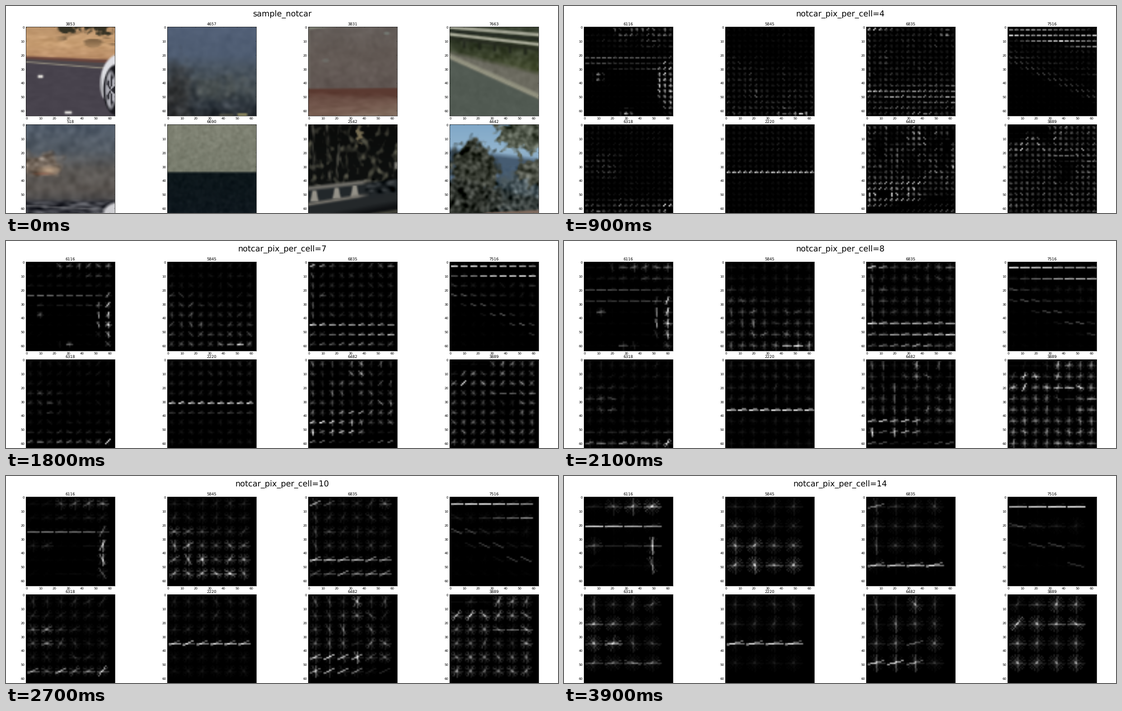
Write a matplotlib script that moves like this. It is 1222x458 px and loops after 4.2 s.

```python
import numpy as np
import matplotlib.pyplot as plt
from matplotlib.animation import FuncAnimation

W, H, DPI = 1222, 458, 72
N = 64                      # picture side in samples
SIDE = 197                  # panel side on the stage
LEFTS = (44, 357, 669, 982)
TOPS = (46, 262)
BINS = 10                   # gradient orientations

plt.rcParams["font.family"] = "DejaVu Sans"
plt.rcParams["text.hinting"] = "no_hinting"

Y, X = np.mgrid[0:N, 0:N].astype(float)


# ---- painting helpers -------------------------------------------------
def noise(seed, sx, sy=None):
    """Smooth random field with unit spread."""
    sy = sx if sy is None else sy
    f = np.fft.fftfreq(N)
    gain = np.exp(-2 * np.pi ** 2 * ((sx * f[None, :]) ** 2 + (sy * f[:, None]) ** 2))
    raw = np.random.default_rng(seed).normal(size=(N, N))
    field = np.fft.ifft2(np.fft.fft2(raw) * gain).real
    field -= field.mean()
    return field / field.std()


def cover(d, soft=1.0):
    return np.clip(0.5 - d / soft, 0, 1)


def edge(a, b):
    return a + (b - a) * X / (N - 1)


def below(a, b, soft=1.0):
    return cover(edge(a, b) - Y, soft)


def strip(a, b, h, soft=1.0):
    return cover(abs(Y - edge(a, b)) - h / 2, soft)


def rect(x0, x1, y0, y1, soft=1.0):
    return (cover(abs(X - (x0 + x1) / 2) - (x1 - x0) / 2, soft)
            * cover(abs(Y - (y0 + y1) / 2) - (y1 - y0) / 2, soft))


def blob(cx, cy, rx, ry, soft=1.0, rough=0):
    r = np.hypot((X - cx) / rx, (Y - cy) / ry)
    return cover((r - 1) * min(rx, ry) + rough, soft)


def ramp(*stops):
    ys = [s[0] for s in stops]
    rows = [np.interp(Y, ys, [s[1][c] for s in stops]) for c in range(3)]
    return np.stack(rows, axis=-1)


def paint(p, color, mask):
    p += (np.array(color, float) - p) * mask[..., None]


def grain(p, field):
    p += field[..., None]


# ---- the eight pictures ------------------------------------------------
def road():
    p = ramp((0, (190, 150, 110)), (12, (204, 162, 118)), (22, (186, 142, 104)))
    grain(p, 5 * noise(1, 2, 0.8))
    shade = np.clip(noise(2, 4, 0.9) + 0.1, 0, 1)
    paint(p, (104, 80, 54), shade * rect(24, 66, 4, 14, 8) * 0.7)
    paint(p, (54, 50, 36), blob(30, 0, 7, 5, 2, 1.4 * noise(3, 1)))
    paint(p, (54, 50, 36), blob(53, 0, 12, 4, 2, 1.4 * noise(4, 1)))
    paint(p, (104, 68, 60), below(21, 23.5, 1.5))
    paint(p, (78, 72, 76), below(22.8, 26))
    paint(p, (144, 138, 126), strip(25, 30, 1))
    paint(p, (72, 67, 77), below(25.8, 30.8))
    grain(p, 1.2 * noise(5, 2, 0.8) * below(26, 31))
    paint(p, (238, 236, 230), rect(8.2, 11.8, 34.4, 36.4, 1.4))
    paint(p, (232, 230, 226), rect(27.5, 32.5, 60.3, 62, 1.4))
    paint(p, (222, 222, 227), blob(68, 40, 15, 21, 1.4) * cover(Y - 51, 2))
    paint(p, (146, 146, 150), blob(68, 42, 15, 17, 2) * cover(X - 54.4, 1.4)
          * cover(Y - 51, 2) * 0.8)
    paint(p, (24, 24, 29), blob(64.5, 45, 9.3, 18))
    paint(p, (172, 172, 180), blob(60.5, 45, 3.8, 13.5))
    turn = np.arctan2((Y - 45) / 13.5, (X - 60.5) / 3.8)
    paint(p, (26, 26, 32), np.clip(2 * np.cos(5 * turn), 0, 0.9) * blob(60.7, 45, 3.2, 11))
    return p


def haze():
    p = ramp((0, (82, 96, 119)), (20, (80, 94, 115)), (30, (74, 85, 96)),
             (46, (66, 75, 80)), (56, (48, 56, 63)), (63, (40, 45, 50)))
    paint(p, (84, 88, 82), blob(32, 42, 20, 6, 8, 2 * noise(11, 2)) * 0.4)
    paint(p, (46, 46, 46), blob(4, 50, 12, 20, 14, 1.5 * noise(12, 2)) * 0.8)
    paint(p, (40, 47, 56), blob(36, 56, 18, 5, 8, 2 * noise(13, 2)) * 0.5)
    grain(p, np.interp(Y, [0, 24, 34, 63], [1.5, 2.2, 5, 8]) * noise(14, 1.4))
    paint(p, (104, 100, 78), rect(37, 47, 62, 64) * 0.5)
    paint(p, (132, 128, 92), rect(50, 57, 61.6, 65))
    return p


def wall():
    p = ramp((0, (101, 94, 90)), (20, (99, 90, 85)), (43, (97, 87, 83)))
    grain(p, 2 * noise(21, 1.2) + 1.6 * noise(22, 4))
    paint(p, (118, 124, 118), 0.8 * blob(56, 4.5, 2, 1.2) + 0.5 * blob(12, 24, 2.5, 1.3))
    paint(p, (124, 126, 114), cover(Y - 2 + X / 8, 1.5))
    paint(p, (112, 108, 100), cover(X - 0.6, 1.4) * cover(Y - 44))
    paint(p, (91, 58, 49), below(44.2, 43.6, 1.4))
    paint(p, (108, 80, 70), below(49, 50, 4.5))
    paint(p, (120, 94, 82), below(58, 52, 6) * 0.8)
    paint(p, (130, 110, 95), below(68, 57, 6) * 0.8)
    grain(p, 3.2 * noise(23, 2.4, 0.9) * below(47, 47, 3))
    return p


def rail():
    p = ramp((0, (60, 68, 52)), (8, (46, 54, 38)), (30, (70, 78, 50)))
    grain(p, 6 * noise(31, 1.3) * below(7, 14, 3))
    paint(p, (108, 107, 96), below(18, 33, 4))
    grain(p, 3 * noise(32, 1.2))
    paint(p, (160, 162, 146), strip(0.2, 5.5, 2.4, 1.3))
    paint(p, (38, 44, 36), strip(2.9, 8.6, 2, 1.3))
    paint(p, (166, 168, 150), strip(5.2, 12.4, 2.2, 1.3))
    paint(p, (36, 40, 30), strip(7.9, 15.8, 2, 2) * 0.8)
    for x in range(9, 64, 11):
        paint(p, (28, 32, 24), rect(x, x + 2, 9 + x / 9, 14 + x / 9, 1.5) * 0.7)
    paint(p, (146, 146, 128), strip(21.5, 49.5, 4, 2.4))
    paint(p, (82, 91, 83), below(23.2, 51.4, 2))
    grain(p, 1.3 * noise(33, 1))
    return p


def dusk():
    p = ramp((0, (80, 91, 105)), (18, (84, 92, 101)), (32, (94, 91, 88)),
             (46, (90, 85, 81)), (53, (78, 76, 76)), (63, (64, 64, 70)))
    grain(p, 5.5 * noise(41, 1.7))
    glow = blob(10, 29, 13, 9, 5, 1.5 * noise(42, 2))
    paint(p, (126, 108, 92), glow * 0.7)
    grain(p, 20 * noise(44, 1.6, 1.1) * glow)
    paint(p, (196, 168, 140), blob(16, 32.5, 5.5, 2.4, 3.5) * 0.85)
    paint(p, (152, 92, 72), blob(12, 35, 5, 0.8, 1.5) * 0.5)
    paint(p, (54, 56, 64), below(54, 54, 3) * 0.8)
    grain(p, 22 * noise(43, 2.2, 0.9) * below(55, 54, 3))
    paint(p, (140, 140, 144), strip(58, 61, 1, 1.4) * 0.6)
    paint(p, (206, 206, 210), blob(66, 64, 11, 8.5, 2.4))
    return p


def split():
    p = ramp((0, (127, 130, 115)), (33, (121, 125, 110)))
    grain(p, 4 * noise(51, 0.8))
    dark = ramp((33, (12, 22, 26)), (63, (15, 24, 30)))
    grain(dark, 2.2 * noise(52, 0.8))
    m = below(33.8, 33.8, 1.2)[..., None]
    return p * (1 - m) + dark * m


def bridge():
    p = ramp((0, (10, 11, 10)), (40, (14, 16, 15)))
    spots = np.clip(noise(61, 1.1, 1.5) - 0.1, 0, 2.4)
    p += spots[..., None] * np.array([31, 30, 25])
    for x, lean in ((13, 2), (22, -2), (3, 1)):
        trunk = cover(abs(X - x - lean * Y / 40) - 1, 1.5) * cover(Y - 40, 6)
        paint(p, (74, 73, 66), trunk * np.clip(0.5 + 0.5 * noise(62 + x, 1, 2), 0, 1))
    paint(p, (118, 108, 82), blob(36.5, 9, 1.6, 5, 1.8, 0.8 * noise(63, 1)))
    paint(p, (128, 127, 120), rect(61.5, 65, 26.5, 31.5, 1.6))
    paint(p, (34, 39, 42), below(45, 39, 2))
    paint(p, (112, 110, 104), strip(45.5, 38.5, 2.8, 2.2) * cover(X - 42, 8))
    for x, y in ((4, 51), (20, 49), (33, 47.5)):
        post = cover(abs(X - x) - 1.4 - (Y - y + 4) * 0.2, 1.6) * cover(abs(Y - y) - 4)
        paint(p, (148, 145, 136), post)
    paint(p, (116, 113, 106), strip(57, 47, 2.4, 2.2) * cover(X - 40, 8))
    right = rect(40, 62, 39, 49, 3)
    grain(p, 18 * noise(64, 1.5, 1) * right)
    paint(p, (36, 40, 42), below(58.5, 48.5, 2))
    paint(p, (14, 16, 18), below(68, 56, 5))
    paint(p, (68, 68, 58), strip(71, 62, 2.4, 2) * cover(44 - X, 4))
    return p


def grove():
    p = ramp((0, (128, 168, 200)), (18, (146, 180, 206)), (24, (138, 170, 196)))
    paint(p, (70, 92, 114), below(17, 25, 4))
    paint(p, (78, 88, 86), blob(50, 50, 24, 15, 6, 2 * noise(71, 2)) * 0.7)
    paint(p, (72, 76, 66), blob(60, 34, 12, 10, 3, 1.8 * noise(72, 1.3)))
    leaves = blob(54, 5, 20, 13, 4, 2.6 * noise(73, 1.1))
    paint(p, (80, 87, 74), leaves)
    tree = blob(17, 32, 17, 21, 4, 1.6 * noise(74, 1.2))
    paint(p, (52, 56, 47), tree)
    paint(p, (46, 50, 44), blob(10, 56, 28, 16, 4, 1.5 * noise(75, 2)))
    paint(p, (52, 58, 54), blob(50, 58, 24, 9, 5, 1.5 * noise(76, 2)) * 0.8)
    calm = 1 - 0.85 * blob(40, 33, 7, 9, 3)
    land = np.clip(tree + leaves + below(36, 26, 3), 0, 1) * calm
    grain(p, 20 * noise(77, 1) * land)
    paint(p, (126, 106, 94), below(64, 61, 1.4) * cover(25 - X, 3))
    return p


# ---- gradient glyphs ---------------------------------------------------
def line_steps(k, b):
    """Offsets of the stroke for bin b around a cell centre."""
    r = max(k // 2 - 1, 0)
    a = np.pi * b / BINS
    dx, dy = r * np.cos(a), r * np.sin(a)
    r0, c0, r1, c1 = (int(np.floor(round(v, 9))) for v in (-dx, dy, dx, -dy))
    n = max(abs(r1 - r0), abs(c1 - c0))
    t = np.linspace(0, 1, n + 1)
    rr = np.floor(r0 + (r1 - r0) * t + 0.5).astype(int)
    cc = np.floor(c0 + (c1 - c0) * t + 0.5).astype(int)
    return zip(rr, cc)


def glyphs(gray, k):
    gx, gy = np.zeros((N, N)), np.zeros((N, N))
    gx[:, 1:-1] = gray[:, 2:] - gray[:, :-2]
    gy[1:-1] = gray[2:] - gray[:-2]
    mag = np.hypot(gx, gy)
    which = (np.degrees(np.arctan2(gy, gx)) % 180 // (180 / BINS)).astype(int) % BINS
    n = N // k
    end = n * k
    out = np.zeros((N, N))
    for b in range(BINS):
        part = np.where(which == b, mag, 0)[:end, :end]
        hist = part.reshape(n, k, n, k).sum(axis=(1, 3))
        for dr, dc in line_steps(k, b):
            out[k // 2 + dr:end:k, k // 2 + dc:end:k] += hist
    return out


# ---- stage -------------------------------------------------------------
photos = [np.clip(f(), 0, 255).astype(np.uint8)
          for f in (road, haze, wall, rail, dusk, split, bridge, grove)]
grays = [p @ np.array([0.299, 0.587, 0.114]) for p in photos]
PHOTO_IDS = (3853, 4657, 3831, 7663, 518, 6690, 2542, 4442)
GLYPH_IDS = (6116, 5845, 6835, 7516, 6318, 2220, 6482, 3889)

fig = plt.figure(figsize=(W / DPI, H / DPI), dpi=DPI, facecolor="white")


def label(x, y, size):
    return fig.text(x / W, 1 - y / H, "", size=size, ha="center", va="baseline")


heading = label(611.3, 22.8, 17.7)
images, names = [], []
for i, photo in enumerate(photos):
    x, y = LEFTS[i % 4], TOPS[i // 4]
    ax = fig.add_axes([x / W, 1 - (y + SIDE) / H, SIDE / W, SIDE / H])
    images.append(ax.imshow(photo, cmap="gray", interpolation="bilinear", aspect="auto"))
    ax.set_xticks(range(0, N, 10))
    ax.set_yticks(range(0, N, 10))
    ax.tick_params(direction="in", top=True, right=True, length=2.4,
                   width=0.3, pad=2.6, labelsize=7.1)
    for s in ax.spines.values():
        s.set_linewidth(0.7)
    names.append(label(x + SIDE / 2, y - 3, 8.5))


def update(i):
    k = i + 1               # cell size; the first step shows the pictures
    heading.set_text(f"notcar_pix_per_cell={k}" if i else "sample_notcar")
    for j, im in enumerate(images):
        data = glyphs(grays[j], k) if i else photos[j]
        im.set_data(data)
        if i:
            im.set_clim(data.min(), data.max())
        names[j].set_text(str((GLYPH_IDS if i else PHOTO_IDS)[j]))
    return [heading, *images, *names]


anim = FuncAnimation(fig, update, frames=14, interval=300, repeat=True, repeat_delay=0)
plt.show()
```
